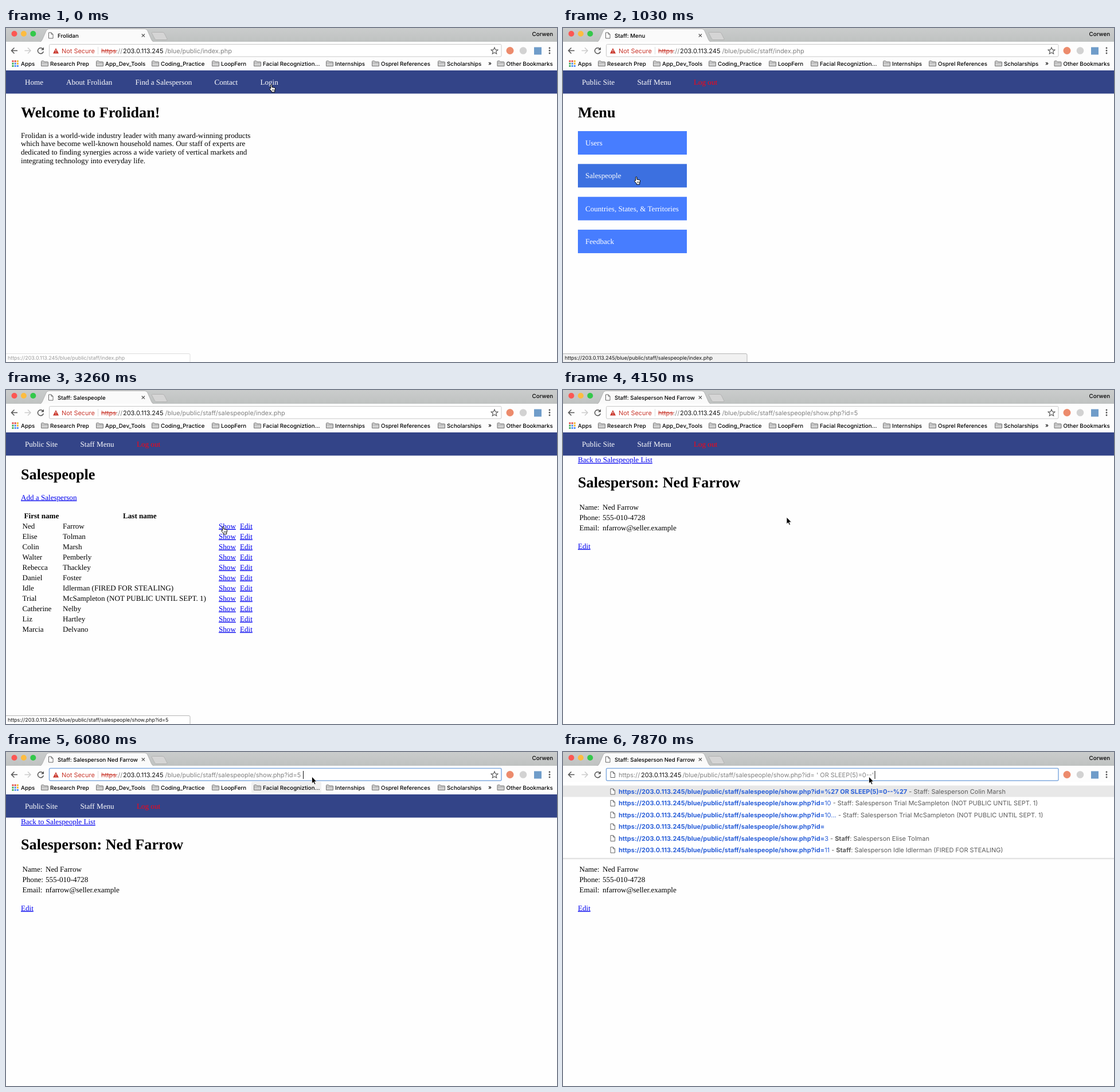
Animation of 961x583 px, one loop 8000 ms. Source, as an HTML page:

```html
<!DOCTYPE html>
<html lang="en">
<head>
<meta charset="utf-8">
<title>Staff site walkthrough</title>
<style>
  html, body { margin: 0; width: 100%; height: 100%; overflow: hidden; background: #fff; }
  svg { display: block; width: 961px; height: 583px; }
  text { text-rendering: geometricPrecision; white-space: pre; }
  .page { font: 13.1px "Liberation Serif", "Times New Roman", serif; }
  .head { font: bold 26.2px "Liberation Serif", "Times New Roman", serif; }
  .b { font-weight: bold; }
  .link { fill: #00e; text-decoration: underline; }
  .ui { font: 500 9.75px Inter, "Open Sans", sans-serif; }
  .tab { font-size: 9.6px; }
  .url { font: 10.95px Inter, "Open Sans", sans-serif; fill: #808080; }
  .row { font: 11px Inter, "Open Sans", sans-serif; fill: #5c5c5c; }
  .hit { fill: #2b60d9; }
  .status { font: 8.92px Inter, "Open Sans", sans-serif; }
</style>
</head>
<body>
<svg id="stage" viewBox="0 0 961 583"></svg>
<script>
const LOOP = 8000;
const HOST = '203.0.113.245';
const BRAND = 'Frolidan';
const STAFF = '/blue/public/staff/';
const SALES = STAFF + 'salespeople/';
const SHOW = SALES + 'show.php?id=';
const INJECT = "' OR SLEEP(5)=0--'";

const people = [
  ['Ned', 'Farrow'], ['Elise', 'Tolman'], ['Colin', 'Marsh'], ['Walter', 'Pemberly'],
  ['Rebecca', 'Thackley'], ['Daniel', 'Foster'], ['Idle', 'Idlerman (FIRED FOR STEALING)'],
  ['Trial', 'McSampleton (NOT PUBLIC UNTIL SEPT. 1)'], ['Catherine', 'Nelby'],
  ['Liz', 'Hartley'], ['Marcia', 'Delvano']
];
const fullName = i => people[i].join(' ');

// Each step changes part of the state and keeps the rest.
const steps = [
  [0, { page: 'home', title: BRAND, path: '/blue/public/index.php', status: STAFF + 'index.php',
        faded: true, statusFill: '#fff', cursor: ['hand', 459.5, 98.5] }],
  [140, { faded: false }],
  [290, { page: 'menu', title: 'Staff: Menu', path: STAFF + 'index.php', status: '',
          cursor: ['arrow', 461, 99] }],
  [440, { cursor: ['arrow', 425, 125] }],
  [590, { cursor: ['arrow', 325, 180] }],
  [740, { cursor: ['arrow', 222, 232] }],
  [880, { cursor: ['hand', 146, 256], hover: 1, status: SALES + 'index.php', faded: true }],
  [1030, { cursor: ['hand', 124.5, 259.5], faded: false, statusFill: '#f1f1f1' }],
  [1630, { path: SALES + 'index.php' }],
  [1780, { page: 'list' }],
  [1930, { title: 'Staff: Salespeople', cursor: ['beam', 129, 265] }],
  [2080, { faded: true }],
  [2220, { status: '' }],
  [2670, { cursor: ['beam', 146, 264] }],
  [2820, { cursor: ['arrow', 210, 258] }],
  [2970, { cursor: ['arrow', 310, 247] }],
  [3110, { cursor: ['hand', 371, 240], status: SHOW + 5, statusFill: '#fff' }],
  [3260, { cursor: ['hand', 375.5, 238], faded: false }],
  [4000, { page: 'detail', title: 'Staff: Salesperson ' + fullName(0), path: SHOW + 5, faded: true }],
  [4150, { status: '', cursor: ['arrow', 390, 222] }],
  [4290, { cursor: ['arrow', 455, 140] }],
  [4440, { cursor: ['arrow', 500, 91] }],
  [5030, { cursor: ['arrow', 505, 86] }],
  [5180, { cursor: ['arrow', 512, 76] }],
  [5330, { cursor: ['arrow', 524, 58], mark: true }],
  [5480, { cursor: ['beam', 533, 46] }],
  [5630, { cursor: ['beam', 534, 44] }],
  [5780, { cursor: ['arrow', 533.5, 43], focus: true, selected: true }],
  [6080, { selected: false, caret: 518.5 }],
  [6680, { caret: 0 }],
  [7280, { caret: 518.5 }],
  [7570, { typed: '', open: true, caret: 442.5 }],
  [7870, { typed: INJECT, caret: 544 }]
];

const text = (x, y, s, cls = 'page', attrs = '') =>
  `<text x="${x}" y="${y}" class="${cls}" ${attrs}>${s}</text>`;
const rect = (x, y, w, h, fill, attrs = '') =>
  `<rect x="${x}" y="${y}" width="${w}" height="${h}" fill="${fill}" ${attrs}/>`;
const path = (d, fill, stroke = 'none', attrs = '') =>
  `<path d="${d}" fill="${fill}" stroke="${stroke}" ${attrs}/>`;
const dot = (x, y, r, fill) => `<circle cx="${x}" cy="${y}" r="${r}" fill="${fill}"/>`;
const span = (s, cls) => `<tspan class="${cls}">${s}</tspan>`;
const at = (x, y, s) => `<g transform="translate(${x} ${y})">${s}</g>`;

const sheet = (x, y) => at(x, y, path('M.5.5H5L8 3.5V10.5H.5ZM5 .5V3.5H8', '#fff', '#666'));
const folder = x => at(x, 57, path('M.5 9.5V1.5Q.5.5 1.5.5H4.5L6 2H11.5Q12.5 2 12.5 3V9.5Z', '#d0d0d0', '#777') +
  path('M1 4H12', 'none', '#999', 'stroke-width=".8"'));

function tabStrip(s) {
  return rect(0, 0, 961, 24, 'url(#strip)') +
    ['#fc5753', '#fdbc40', '#34c84a'].map((c, i) => dot(14.5 + 16.4 * i, 10, 5, c)).join('') +
    path('M254 8.5Q254 7.5 255.5 7.5H273Q275 7.5 276 9L281 19Q281.500 20.500 280 20.500H262Q260.500 20.500 259.500 19Z',
      '#d5d5d5', '#adadad', 'stroke-width=".8"') +
    path('M58 24.500Q62 24 63.500 20L70 5Q71.500 1.500 75 1.500H242Q245.500 1.500 247 5L253.500 20Q255 24 259 24.500Z',
      '#fafafa', '#aaa', 'stroke-width=".8"') +
    sheet(74, 7.500) + text(90, 16.500, s.title, 'ui tab') +
    path('M236.800 10.500L242 15.700M242 10.500L236.800 15.700', 'none', '#555', 'stroke-width="1.2"') +
    text(954, 14, 'Corwen', 'ui', 'text-anchor="end"');
}

function addressText(s) {
  if (s.open) {
    return sheet(82.500, 34) + text(97, 43.700, 'https://', 'url') +
      text(136, 43.700, HOST, 'url', 'style="fill:#111"') +
      text(208.500, 43.700, SHOW, 'url') + text(442, 43.700, s.typed, 'url');
  }
  return path('M87 35L92 44.500H82Z', '#c9362b') + rect(86.500, 38, 1, 3, '#fff') + rect(86.500, 42, 1, 1, '#fff') +
    text(97, 43.700, 'Not Secure', 'url', 'style="fill:#c9362b"') + rect(160, 33, 1, 13, '#ddd') +
    (s.selected ? rect(166, 33, 353, 14, '#b4d5fe') : '') +
    text(166, 43.700, span('https', 'sec') + '://', 'url') + rect(166, 39.500, 27.500, 1, '#c9362b') +
    text(204, 43.700, HOST, 'url', 'style="fill:#111"') + text(277.500, 43.700, s.path, 'url') +
    path('M852 34L853.700 37.900L857.900 38.200L854.700 41L855.700 45L852 42.800L848.300 45L849.300 41L846.100 38.200L850.300 37.900Z',
      'none', '#555', 'stroke-width="1.1"');
}

function toolbar(s) {
  return rect(0, 24, 961, 50, '#fdfdfd') +
    path('M20 39.500H9.500M14.500 34.500L9.500 39.500L14.500 44.500', 'none', '#555', 'stroke-width="1.5"') +
    path('M32.500 39.500H43M38 34.500L43 39.500L38 44.500', 'none', '#ccc', 'stroke-width="1.5"') +
    path('M64.300 36.500A5 5 0 1 0 65.300 41', 'none', '#555', 'stroke-width="1.5"') +
    path('M66 33.500V38.500H61Z', '#555') +
    rect(75.500, 28.500, 788.500, 21.500, '#fff', `rx="2" stroke="${s.focus ? '#83ace0' : '#c9c9c9'}" stroke-width="${s.focus ? 1.5 : 1}"`) +
    addressText(s) +
    (s.caret ? rect(s.caret - .5, 33, 1, 14, '#111') : '') +
    dot(879, 39.500, 6.500, '#ec8b6c') + dot(902, 39.500, 6.300, '#d2d2d2') +
    rect(921, 33.500, 13, 13, '#6f9cc9') +
    [35, 39.500, 44].map(y => dot(948, y, 1.400, '#555')).join('');
}

function bookmarks(s) {
  const colours = ['#e0483e', '#e0483e', '#f0b428', '#38a852', '#4688f1', '#f0b428', '#38a852', '#4688f1', '#4688f1'];
  const items = [[61, 'Research Prep'], [157, 'App_Dev_Tools'], [254, 'Coding_Practice'], [359, 'LoopFern'],
    [432, 'Facial Recogniztion...'], [558, 'Internships'], [638, 'Osprel References'],
    [753, 'Scholarships'], [856.500, 'Other Bookmarks']];
  return (s.mark ? rect(428, 52, 122, 19, '#f0f0f0', 'rx="2"') : '') +
    colours.map((c, i) => rect(10.500 + i % 3 * 4.200, 56.500 + Math.floor(i / 3) * 4.200, 2.900, 2.900, c)).join('') +
    text(26, 65.500, 'Apps', 'ui') +
    items.map(([x, name]) => folder(x) + text(x + 16, 65.500, name, 'ui')).join('') +
    text(841, 65, '»', 'ui');
}

const nav = items => rect(0, 74, 961, 40.500, '#348') +
  items.map(([x, s, fill = '#fff']) => text(x, 99.300, s, 'page', `fill="${fill}"`)).join('');
const staffNav = () => nav([[33, 'Public Site'], [129.500, 'Staff Menu'], [228, 'Log out', '#f01']]);

const pages = {
  home: () => nav([[33, 'Home'], [105, 'About ' + BRAND], [225.500, 'Find a Salesperson'], [363.500, 'Contact'], [443.500, 'Login']]) +
    text(26, 155.500, `Welcome to ${BRAND}!`, 'head') +
    [BRAND + ' is a world-wide industry leader with many award-winning products',
      'which have become well-known household names. Our staff of experts are',
      'dedicated to finding synergies across a wide variety of vertical markets and',
      'integrating technology into everyday life.'
    ].map((s, i) => text(26, 191.700 + 14.750 * i, s)).join(''),

  menu: s => staffNav() + text(26, 155.500, 'Menu', 'head') +
    ['Users', 'Salespeople', 'Countries, States, &amp; Territories', 'Feedback'].map((label, i) => {
      const y = 180 + 57.350 * i;
      return rect(26, y, 190, 41, s.hover === i ? '#3c70e0' : '#477dff') +
        text(39, y + 25, label, 'page', 'fill="#fff"');
    }).join(''),

  list: () => staffNav() + text(26, 155.500, 'Salespeople', 'head') +
    text(26, 191.700, 'Add a Salesperson', 'page link') +
    text(31.500, 223.500, 'First name', 'page b') + text(204, 223.500, 'Last name', 'page b') +
    people.map(([first, last], i) => {
      const y = 241.700 + 18 * i;
      return text(28.500, y, first) + text(99, y, last) +
        text(371, y, 'Show', 'page link') + text(408, y, 'Edit', 'page link');
    }).join(''),

  detail: () => staffNav() + text(26, 126.200, 'Back to Salespeople List', 'page link') +
    text(26, 170.300, 'Salesperson: ' + fullName(0), 'head') +
    [['Name:', fullName(0)], ['Phone:', '555-010-4728'], ['Email:', 'nfarrow@seller.example']]
      .map(([k, v], i) => text(28.500, 209 + 18 * i, k) + text(69, 209 + 18 * i, v)).join('') +
    text(26, 276.700, 'Edit', 'page link')
};

function dropdown(s) {
  const who = i => 'Salesperson ' + fullName(i);
  const rows = [
    { end: '%27 OR SLEEP(5)=0--%27', heavy: s.typed, note: 'Staff: ' + who(2) },
    { end: '10', note: 'Staff: ' + who(7) },
    { end: '10...', note: 'Staff: ' + who(7) },
    { end: '' },
    { end: '3', note: span('Staff', 'b') + ': ' + who(1) },
    { end: '11', note: span('Staff', 'b') + ': ' + who(6) }
  ];
  if (!s.typed) rows.unshift(rows.splice(3, 1)[0]);
  return rect(0, 52, 961, 133, '#fff') + rect(0, 185, 961, 1, '#d4d4d4') + rect(0, 186, 961, 2, '#f1f1f1') +
    rect(0, 58.500, 961, 20, '#e8e8e8') +
    rows.map((r, i) => {
      const y = 69 + 20.400 * i;
      return sheet(82.500, y - 5.500) + text(97, y + 4, span('https://' + HOST + SHOW, 'hit b') +
        span(r.end, r.heavy ? 'hit b' : 'hit') + (r.note ? ' - ' + r.note : ''), 'row');
    }).join('');
}

function statusBar(s) {
  const ink = s.faded ? '#999' : '#111', edge = s.faded ? '#ddd' : '#b5b5b5';
  return rect(-1, 568.500, 322, 16, s.statusFill, `rx="2" stroke="${edge}"`) +
    text(3, 579, 'https://' + HOST + s.status, 'status', `fill="${ink}"`);
}

const cursors = {
  hand: path('M2.200 1.400Q2.200.2 3.300.2Q4.400.2 4.400 1.400V4.800L8.900 5.700Q10.300 6.100 10.200 7.600L9.200 11.300V13.500H3.700V12L.4 8.200Q-.2 6.900.9 6.600Q1.600 6.500 2.200 7.400Z',
    '#fff', '#000') + path('M5 8.500V11M6.700 8.500V11M8.300 8.500V11', 'none', '#000', 'stroke-width=".7"'),
  arrow: path('M0 0V12L2.700 9.500L4.600 13.700L6.500 12.900L4.700 8.800H8.400Z', '#000', '#fff', 'stroke-width=".8"'),
  beam: path('M-2.500-6Q0-6 0-4.500V4.500Q0 6-2.500 6M2.500-6Q0-6 0-4.500M2.500 6Q0 6 0 4.500M-1.500 2.500H1.500', 'none', '#111', 'stroke-width="1.1"')
};

const defs = `<defs><linearGradient id="strip" x2="0" y2="1"><stop stop-color="#cacccc"/>
  <stop offset="1" stop-color="#bfc2c1"/></linearGradient></defs><style>.sec { fill: #c9362b; }</style>`;

function view(s) {
  const [kind, x, y] = s.cursor;
  return defs + rect(0, 0, 961, 583, '#fefefe') + pages[s.page](s) + tabStrip(s) + toolbar(s) +
    (s.open ? dropdown(s) : bookmarks(s)) + (s.status ? statusBar(s) : '') + at(x, y, cursors[kind]);
}

const stage = document.getElementById('stage');
let shown = -1;

function draw(now) {
  const t = now % LOOP;
  const count = steps.filter(([time]) => time <= t).length;
  if (count !== shown) {
    shown = count;
    stage.innerHTML = view(Object.assign({}, ...steps.slice(0, count).map(step => step[1])));
  }
}

const start = performance.now();
function tick() {
  draw(performance.now() - start);
  requestAnimationFrame(tick);
}
tick();
</script>
</body>
</html>
```
